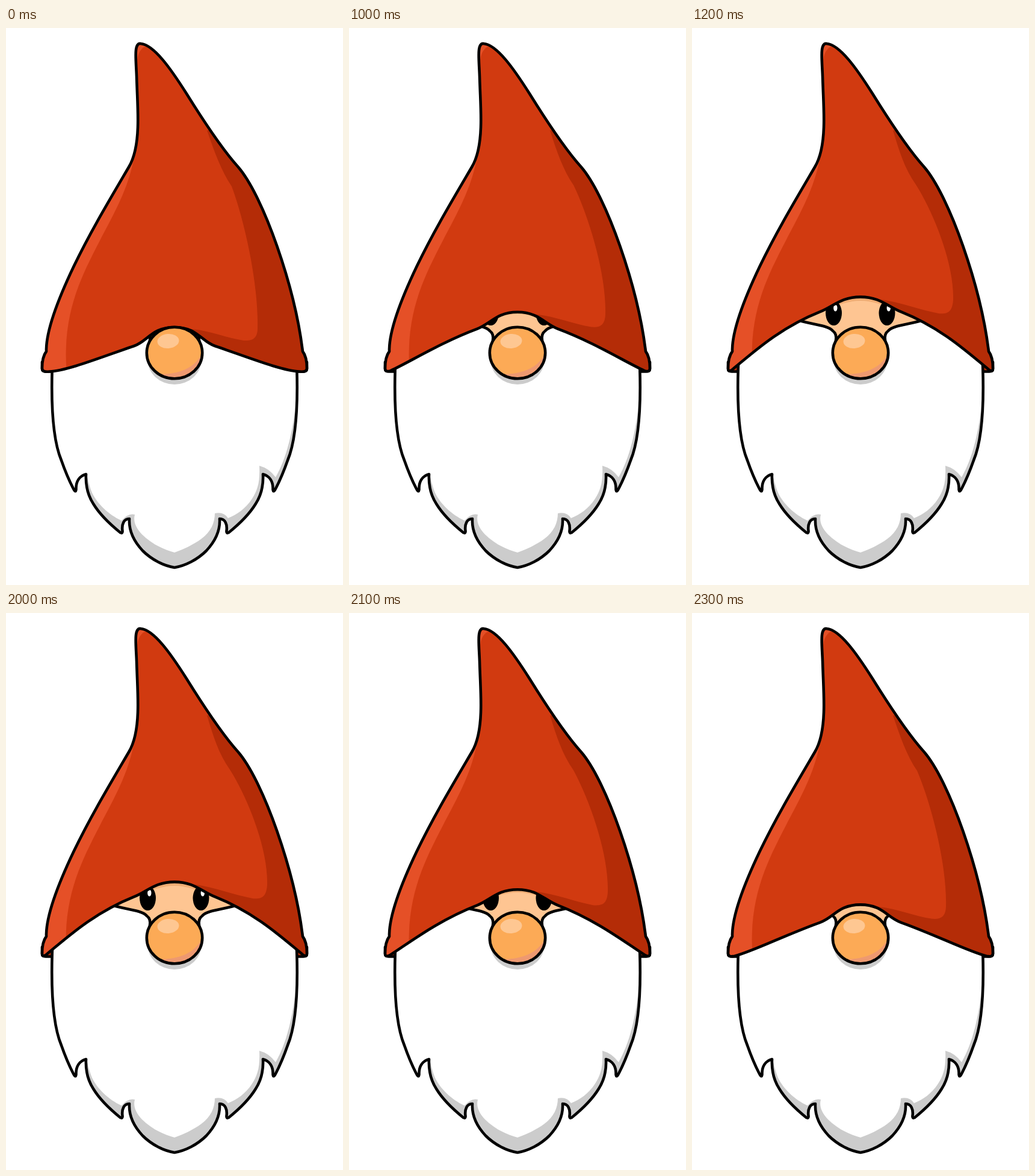
An HTML page that plays this animation: 560 by 925 pixels, repeating every 2400 ms.

```html
<!DOCTYPE html>
<html lang="en">
<head>
<meta charset="utf-8">
<title>Peeking gnome</title>
<style>
html, body { margin: 0; width: 100%; height: 100%; overflow: hidden; background: #fff; }
svg { display: block; width: 560px; height: 925px; }
.line { stroke: #000; stroke-width: 4.6; stroke-linejoin: round; stroke-linecap: round; }
.none { fill: none; }

/* Five hard steps up, five hard steps down */
.hat, .dark, .shade { animation: peek 2.4s steps(4, jump-both) infinite; }
.shade { animation-name: lift; }
@keyframes peek {
  0%, 37.5%, 100% { d: var(--shut); }
  54.166%, 83.333% { d: var(--open); }
}
@keyframes lift {
  0%, 37.5%, 100% { transform: translateY(55px); }
  54.166%, 83.333% { transform: translateY(0); }
}
.hat {
  --shut: path("M224 26C212 24 216 52 217 80C218 115 220 140 219 165C218 195 213 216 204 231C170 289 140 339 113 395C90 443 66 500 67 537C61 545 60 556 60 565C60 571 66 571 72 570.5C100 570 160 546 213 528C236 520 242 497 280 497C318 497 324 520 347 528C400 546 460 570 488 570.5C494 571 500 571 500 565C500 556 499 545 493 537C480 430 428 280 386 231C358 200 328 154 300 109C274 68 246 28 224 26Z");
  --open: path("M224 26C212 24 216 52 217 80C218 115 220 140 219 165C218 195 213 216 204 231C170 289 140 339 113 395C90 443 66 500 67 537C61 545 60 556 60 565C60 571 61 570 65 567C100 533 140 487 213 457C236 447 250 434 280 434C310 434 324 447 347 457C420 487 460 533 495 567C499 570 500 571 500 565C500 556 499 545 493 537C480 430 428 280 386 231C358 200 328 154 300 109C274 68 246 28 224 26Z");
  d: var(--shut);
}
.dark {
  --shut: path("M334 170C346 205 358 238 375 263C398 325 420 430 418 499C418 515 410 520 395 519C365 515 335 501 305 500L300 600L520 600L520 170Z");
  --open: path("M334 170C344 205 352 232 371 259C400 298 440 380 438 440C436 460 430 464 415 463C385 457 350 444 314 438L300 600L520 600L520 170Z");
  d: var(--shut);
}
</style>
</head>
<body>
<svg viewBox="0 0 560 925">
  <defs>
    <path id="beard" d="M78 535C74 610 76 680 92 718C99 738 106 754 113 767Q116 772 116.500 766C116 753 122 744 133 741C132 760 136 776 145 790C157 810 174 825 190 838Q194 840 193.500 835C192 824 196 815 205 815C204 832 211 851 227 868C242 883 262 893 280 896C298 893 318 883 333 868C349 851 356 832 355 815C364 815 368 824 366.500 835Q366 840 370 838C386 825 403 810 415 790C424 776 428 760 427 741C438 744 444 753 443.500 766Q444 772 447 767C454 754 461 738 468 718C484 680 486 610 482 535"/>
    <path id="tab" d="M60 555V566Q60 570.500 66 570.500H78V548Z"/>
    <path id="cheek" d="M160 479C183 492 224 491 234 503Q241 508 239 519"/>
    <g id="eye">
      <ellipse cx="235.500" cy="473.500" rx="13.500" ry="20.500"/>
      <ellipse cx="238.300" cy="465" rx="3.200" ry="5.500" fill="#fff"/>
    </g>
    <ellipse id="nose" cx="280" cy="539.500" rx="46.200" ry="42.800"/>
    <clipPath id="inBeard"><use href="#beard"/></clipPath>
    <clipPath id="inHat"><path class="hat"/></clipPath>
    <clipPath id="inNose"><use href="#nose"/></clipPath>
  </defs>

  <g class="line" fill="#b42c07">
    <use href="#tab"/>
    <use href="#tab" transform="matrix(-1 0 0 1 560 0)"/>
  </g>

  <use href="#beard" fill="#fff"/>
  <path clip-path="url(#inBeard)" fill="#ccc" d="M484 600C478 670 466 715 448 746Q437 731 421 727C422 750 420 765 408 783C398 798 384 808 369 814Q362 803 347 806C347 822 340 837 325 848C312 858 294 866 280 871C260 866 240 855 226 841C216 830 211 820 214 808Q203 805 192 818C170 808 152 790 143 772Q137 757 134 741L100 920H500V600Z"/>
  <use href="#beard" class="line none"/>

  <path fill="#fec592" d="M160 479C183 492 224 491 234 503Q241 508 239 519H321Q319 508 326 503C336 491 377 492 400 479L280 425Z"/>
  <path class="shade" fill="#f0ad74" d="M165 480C205 470 240 442 280 442S355 470 395 480V400H165Z"/>
  <g class="line none">
    <use href="#cheek"/>
    <use href="#cheek" transform="matrix(-1 0 0 1 560 0)"/>
  </g>
  <use href="#eye"/>
  <use href="#eye" x="88.500"/>

  <path class="hat" fill="#d13a10"/>
  <g clip-path="url(#inHat)">
    <path fill="#e55027" d="M214 206C207 258 184 300 160 345C128 408 92 470 101 575H40V206Z"/>
    <path fill="#e55027" d="M217 68C217 46 222 34 233 30L222 20H205V68Z"/>
    <path class="dark" fill="#b42c07"/>
  </g>
  <path class="hat line none"/>

  <ellipse cx="280" cy="550" rx="45" ry="42" fill="#ccc" clip-path="inset(18px 0 0 0)"/>
  <use href="#nose" fill="#fcaa56"/>
  <path clip-path="url(#inNose)" fill="#ee9970" d="M328 536C318 560 296 574 258 575L280 590H330Z"/>
  <ellipse cx="269.500" cy="520" rx="18" ry="12" fill="#fec792" transform="rotate(-5 269.500 520)"/>
  <use href="#nose" class="line none"/>
</svg>
</body>
</html>
```
